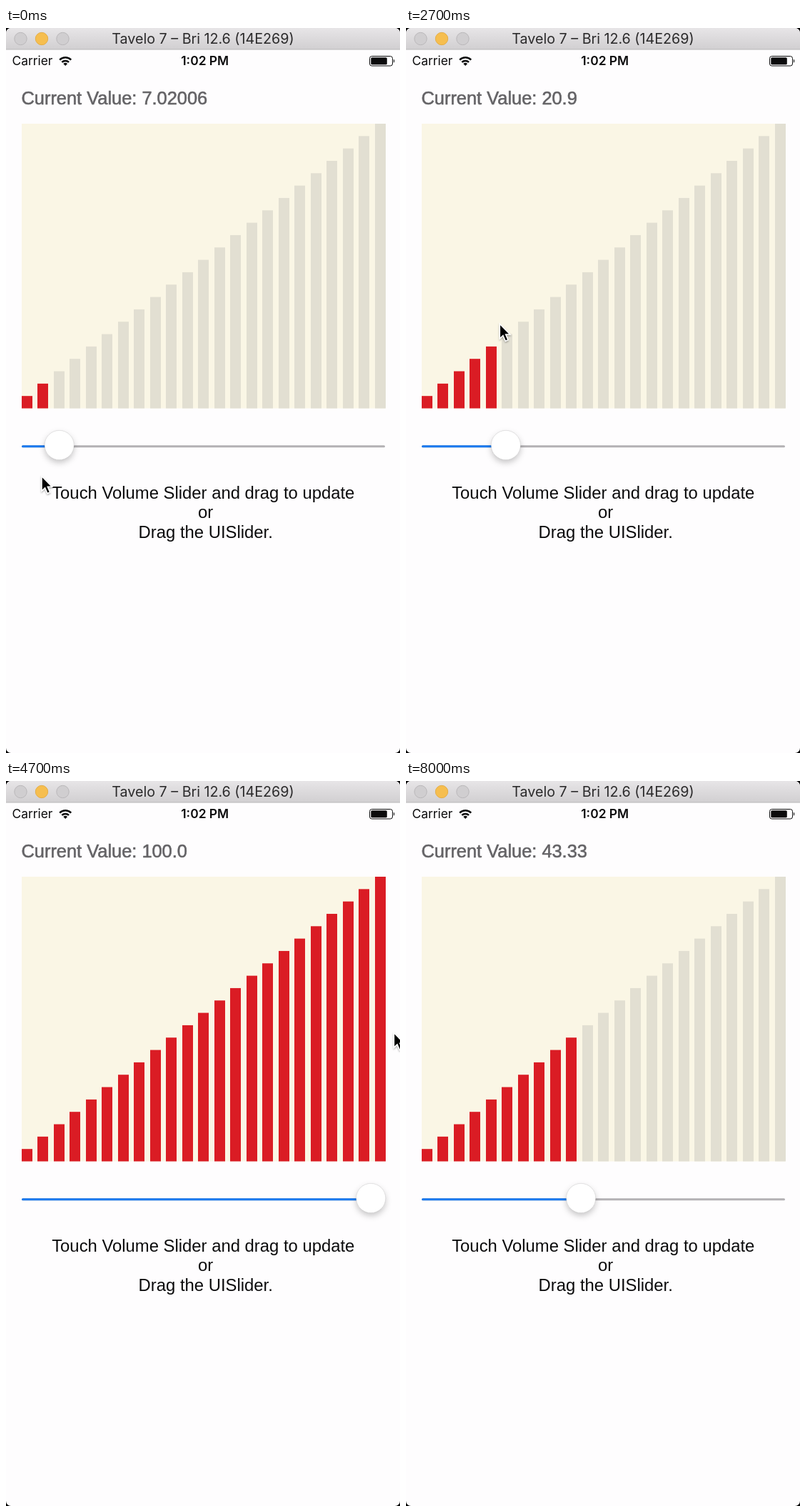
An HTML page for the animation above (8100 ms loop, 552 by 1015 pixels).

```html
<!DOCTYPE html>
<html lang="en">
<head>
<meta charset="utf-8">
<title>Volume slider</title>
<style>
  html, body { margin: 0; width: 100%; height: 100%; overflow: hidden; background: #000; }
  svg { display: block; width: 100vw; height: 100vh; }
  .ui { font-family: Inter, Roboto, sans-serif; }
  .body { font-family: "Liberation Sans", Arial, sans-serif; font-size: 23.85px; fill: #0b0b0c; }
  .value { font-family: "Liberation Sans", Arial, sans-serif; font-size: 25.4px; fill: #646366; stroke: #646366; stroke-width: .6px; }
</style>
</head>
<body>
<svg viewBox="0 0 552 1015">
  <defs>
    <linearGradient id="titleFill" x2="0" y2="1">
      <stop stop-color="#e7e5e7"/>
      <stop offset="1" stop-color="#d1cfd1"/>
    </linearGradient>
    <clipPath id="window"><rect width="552" height="1015" rx="7"/></clipPath>
    <filter id="thumbShadow" x="-50%" y="-50%" width="200%" height="200%">
      <feDropShadow dx="0" dy="4" stdDeviation="4" flood-opacity=".22"/>
    </filter>
    <filter id="cursorShadow" x="-50%" y="-50%" width="200%" height="200%">
      <feDropShadow dx="0" dy="1.5" stdDeviation="1.2" flood-opacity=".35"/>
    </filter>
  </defs>

  <g clip-path="url(#window)">
    <rect width="552" height="1015" fill="#fefdfe"/>
    <rect width="552" height="30" fill="url(#titleFill)"/>
    <rect y="29.5" width="552" height="1" fill="#b9b7b9"/>
    <g fill="#d0ced0" stroke="#b9b7b9">
      <circle cx="20.5" cy="15" r="8.7"/>
      <circle cx="50" cy="15" r="8.7" fill="#f6be4f" stroke="#e3ad48"/>
      <circle cx="79.5" cy="15" r="8.7"/>
    </g>
    <text class="ui" x="276" y="22" font-size="19.7" text-anchor="middle" fill="#2b2a2b">Tavelo 7 – Bri 12.6 (14E269)</text>

    <g class="ui" font-size="17.4" fill="#0b0b0c">
      <text x="8.5" y="52">Carrier</text>
      <text x="278.7" y="52" text-anchor="middle" font-weight="600">1:02 PM</text>
    </g>
    <g fill="none" stroke="#0b0b0c" stroke-width="2.5">
      <path d="M75.2 44.6A11.3 11.3 0 0 1 91.2 44.6"/>
      <path d="M78.3 47.9A7 7 0 0 1 88.1 47.9"/>
      <path d="M83.2 53L80.3 50Q83.2 47.6 86.1 50Z" fill="#0b0b0c" stroke="none"/>
    </g>
    <rect x="509.5" y="39.5" width="32" height="13.5" rx="3" fill="none" stroke="#0b0b0c"/>
    <rect x="511.3" y="41.3" width="22.5" height="10" rx="1.5" fill="#0b0b0c"/>
    <path d="M543 43.5Q545.5 46.2 543 49Z" fill="#0b0b0c"/>

    <text id="label" class="value" x="21.5" y="107"></text>
    <rect x="22" y="134" width="509" height="398.5" fill="#faf6e5"/>
    <g id="bars"></g>

    <rect x="22" y="584.2" width="509" height="3" rx="1.5" fill="#b3b1b4"/>
    <rect id="progress" x="22" y="584.2" height="3" rx="1.5" fill="#1a7af0"/>
    <circle id="thumb" cy="584" r="20.6" fill="#fff" stroke="#000" stroke-opacity=".13" stroke-width=".8" filter="url(#thumbShadow)"/>

    <g class="body">
      <text x="64.2" y="659">Touch Volume Slider and drag to update</text>
      <text x="279.7" y="686.3" text-anchor="middle">or</text>
      <text x="279.7" y="713.7" text-anchor="middle">Drag the UISlider.</text>
    </g>

    <path id="cursor" d="M0 0V20.5L4.6 16.2L8 24L11.6 22.4L8.3 14.8H14.4Z" fill="#000" stroke="#fff" stroke-width="1.5" filter="url(#cursorShadow)"/>
  </g>
</svg>
<script>
const LOOP = 8100, STEP = 100, BARS = 23;
const LEFT = 22, WIDTH = 509, BOTTOM = 532.5, HEIGHT = 398.5;
const CHART_TOUCH = 1950, CHART_RELEASE = 7000;
const SLIDER_FROM = 7.02006, SLIDER_TO = 77.3639;

// Where the hand rests or turns; it eases from one stop to the next.
const stops = [
  { at: 0, x: 49, y: 626 },
  { at: 300, x: 82, y: 592 },         // grabs the slider
  { at: 800, x: 407, y: 594 },
  { at: 900, x: 414, y: 609 },
  { at: 1740, x: 328.17, y: 404 },    // grabs the chart
  { at: 2640, x: 127.2, y: 412 },
  { at: 3300, x: 262, y: 442 },
  { at: 4000, x: 504.59, y: 365 },
  { at: 4500, x: 541, y: 352 },
  { at: 5360, x: 552, y: 345 },
  { at: 6250, x: 242.55, y: 400 },
  { at: 7200, x: 242.55, y: 442 },    // leaves
  { at: 7900, x: 276, y: 1040 }
];

const $ = id => document.getElementById(id);
const label = $("label"), progress = $("progress"), thumb = $("thumb"), cursor = $("cursor");

const clamp = (v, min, max) => Math.min(max, Math.max(min, v));
const mix = (a, b, k) => a + (b - a) * k;
const ease = (t, from, to) => {
  const k = clamp((t - from) / (to - from), 0, 1);
  return k * k * (3 - 2 * k);
};

const bars = Array.from({ length: BARS }, (_, i) => {
  const bar = document.createElementNS("http://www.w3.org/2000/svg", "rect");
  const height = HEIGHT * (i + 1) / BARS;
  const box = { x: Math.round(LEFT + i * 22.48), y: BOTTOM - height, width: 15, height };
  for (const key in box) bar.setAttribute(key, box[key]);
  return $("bars").appendChild(bar);
});

function pointer(t) {
  const next = stops.findIndex(stop => stop.at > t);
  if (next < 0) return stops[stops.length - 1];
  const a = stops[next - 1], b = stops[next];
  const k = ease(t, a.at, b.at);
  return { x: mix(a.x, b.x, k), y: mix(a.y, b.y, k) };
}

function sliderValue(t) {
  return +mix(SLIDER_FROM, SLIDER_TO, ease(t, 300, 800)).toPrecision(6);
}

// The chart follows the pointer one step late and keeps its value after release.
function chartValue(t) {
  const { x } = pointer(Math.min(t - STEP, CHART_RELEASE));
  return Math.round(clamp((x - LEFT) / WIDTH, 0, 1) * 10000) / 100;
}

function draw(time) {
  const t = Math.floor(time % LOOP / STEP) * STEP;
  const value = t < CHART_TOUCH ? sliderValue(t) : chartValue(t);
  const thumbX = 41.7 + 4.695 * value;
  const lit = Math.round(value / 100 * BARS);
  const { x, y } = pointer(t);

  label.textContent = "Current Value: " + (Number.isInteger(value) ? value.toFixed(1) : value);
  bars.forEach((bar, i) => bar.setAttribute("fill", i < lit ? "#da1c24" : "#e2dfd2"));
  progress.setAttribute("width", thumbX - LEFT);
  thumb.setAttribute("cx", thumbX);
  cursor.setAttribute("transform", `translate(${x + 1} ${y + 1.5})`);
}

function tick() {
  draw(performance.now());
  requestAnimationFrame(tick);
}
tick();
</script>
</body>
</html>
```
